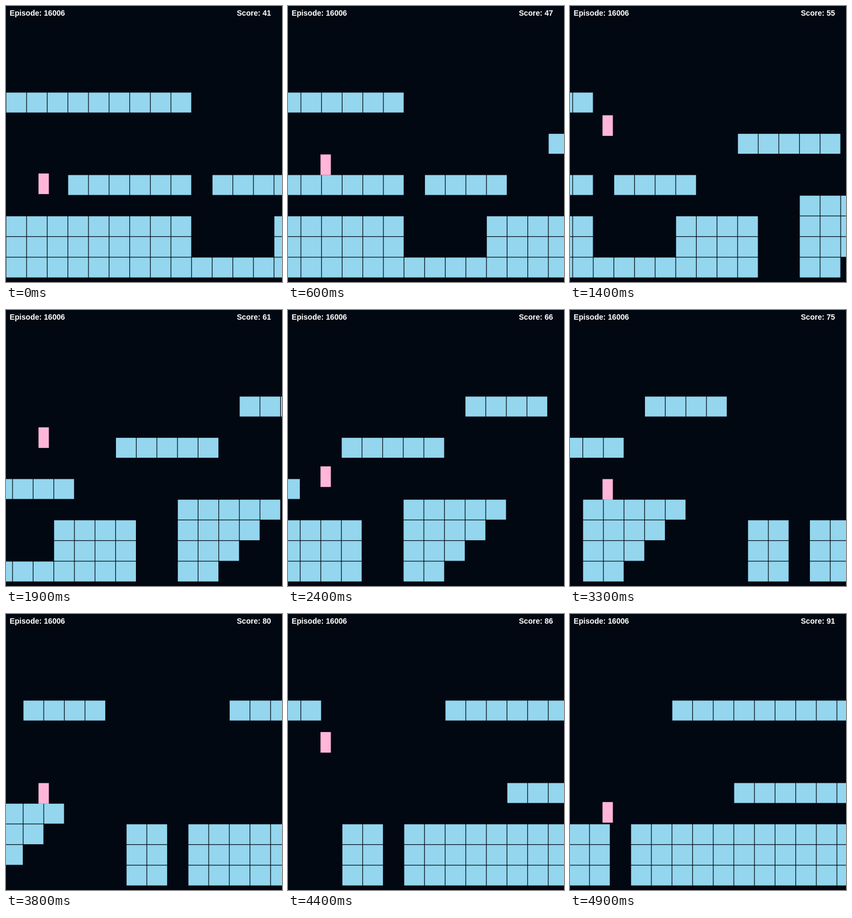
Animation of 512x512 px, one loop 5 s. Source, as an HTML page:

```html
<!DOCTYPE html>
<html lang="en">
<head>
<meta charset="utf-8">
<title>Block runner</title>
<style>
  html, body { margin: 0; width: 100%; height: 100%; overflow: hidden; background: #020812; }
  svg { display: block; width: 100vw; height: 100vh; }
  text { font: bold 14.1px "Liberation Sans", Arial, sans-serif; fill: #fff; white-space: pre; }
  #world { fill: #94d6ee; }
  #player { fill: #ffb6d9; }
</style>
</head>
<body>
<svg viewBox="0 0 512 512">
  <g id="world"></g>
  <rect id="player"/>
  <text x="6.8" y="18">Episode: 16006</text>
  <text id="score" x="428.2" y="18">Score: 41</text>
</svg>
<script>
const LOOP = 5000, STEP = 100;
const CELL = 38.25, SIZE = 37, LEFT = 0.6, TOP = 160.6, GROUND = 8;
const PLAYER = { x: 60.3, width: 19.2, height: 38.2 };
const JUMP = 0.4222, GRAVITY = 0.000938; // px/ms, px/ms²
const jumps = [1168, 2717, 3923];
const scroll = [[0, 0], [19, 408.6], [28, 596.4], [38, 809.7], [49, 1034.8]]; // step, distance

const get = id => document.getElementById(id);
const world = get("world"), player = get("player"), score = get("score");
const colX = col => LEFT + col * CELL;
const rowY = row => TOP + row * CELL;
const set = (node, attrs) => {
  for (const key in attrs) node.setAttribute(key, attrs[key]);
};

const runs = [];

function fill(first, last, top, bottom = top) {
  for (let row = top; row <= bottom; row++) {
    runs.push({ left: colX(first), right: colX(last + 1), top: rowY(row), bottom: rowY(row) + SIZE });
    for (let col = first; col <= last; col++) {
      const block = document.createElementNS("http://www.w3.org/2000/svg", "rect");
      set(block, { x: colX(col), y: rowY(row), width: SIZE, height: SIZE });
      world.append(block);
    }
  }
}

function buildLevel() {
  // the same pair of platforms opens and closes the level
  for (const start of [0, 32]) {
    fill(start, start + 8, 0);
    fill(start + 3, start + 8, 4);
  }
  fill(10, 13, 4);
  fill(16, 20, 2);
  fill(22, 25, 0);

  fill(0, 8, 6, GROUND);
  fill(9, 12, GROUND);
  fill(13, 16, 6, GROUND);
  for (let i = 0; i < 4; i++) fill(19, 23 - i, 5 + i);
  fill(27, 28, 6, GROUND);
  fill(30, 41, 6, GROUND);
}

function distance(n) {
  const i = Math.max(1, scroll.findIndex(p => p[0] >= n));
  const [a, from] = scroll[i - 1], [b, to] = scroll.at(i);
  return from + (to - from) * (n - a) / (b - a);
}

// Run the jump physics once and keep the height at every step.
function simulate() {
  const path = [];
  let y = 310.7, speed = -0.319;
  for (let t = 0; t < LOOP; t++) {
    if (t % STEP === 0) path.push(y);
    if (jumps.includes(t)) speed = -JUMP;
    const before = y, x = PLAYER.x + distance(Math.min(t / STEP, 49));
    y += speed + GRAVITY / 2;
    speed += GRAVITY;
    for (const run of runs) {
      if (run.right < x || run.left > x + PLAYER.width) continue;
      const stand = run.top - PLAYER.height;
      if (speed > 0 && before <= stand + 0.01 && y >= stand) {
        y = stand;
        speed = 0;
      } else if (speed < 0 && before >= run.bottom && y < run.bottom) {
        y = run.bottom;
        speed = 0;
      }
    }
  }
  return path;
}

buildLevel();
set(player, PLAYER);
const path = simulate();

function draw(time) {
  const n = Math.floor(time / STEP);
  set(world, { transform: `translate(${-distance(n)} 0)` });
  set(player, { y: path[n] });
  score.textContent = "Score: " + Math.round(41.16 + n * 50 / 49);
}

const begin = performance.now();
function tick() {
  draw((performance.now() - begin) % LOOP);
  requestAnimationFrame(tick);
}
tick();
</script>
</body>
</html>
```
